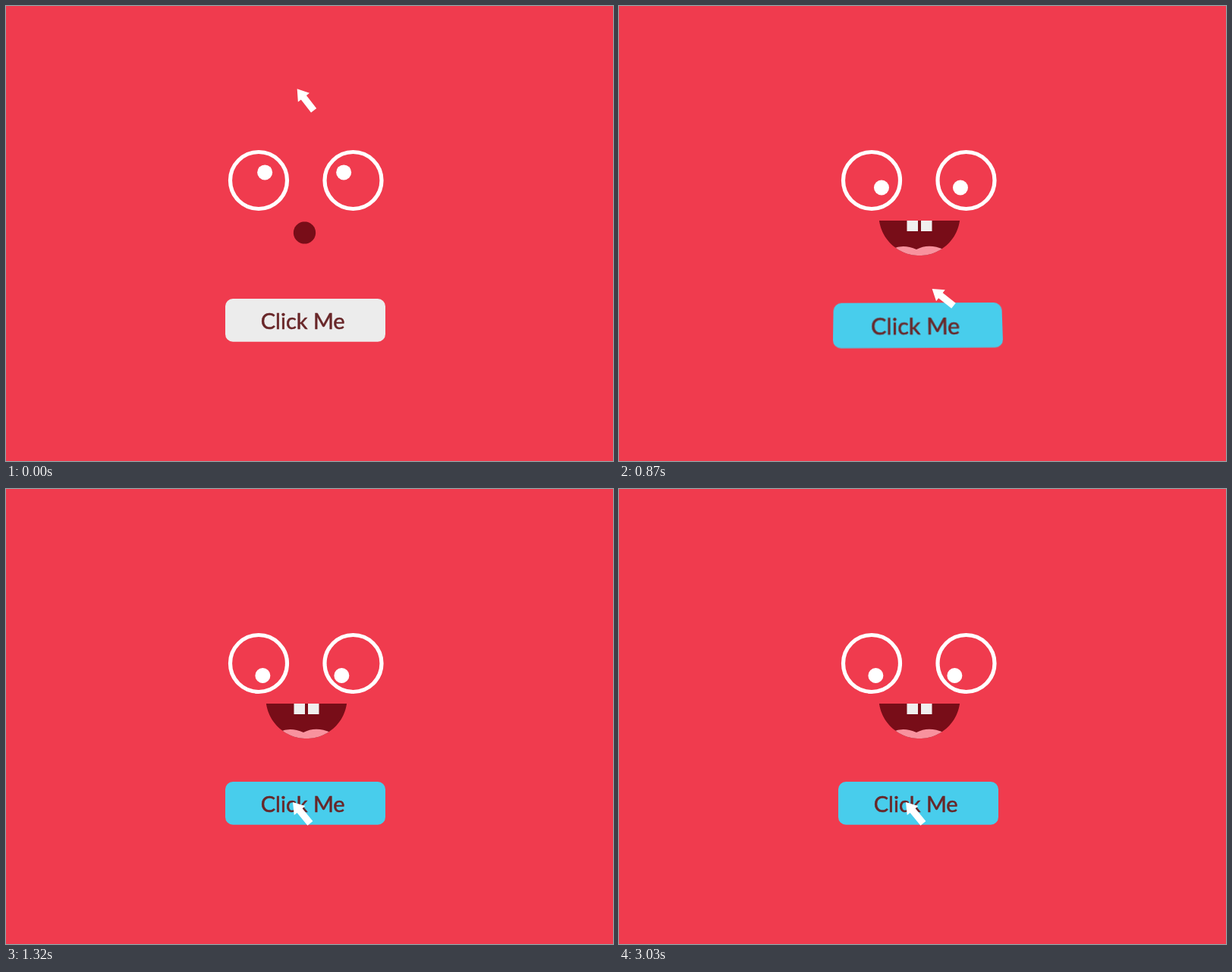
An HTML page that plays this animation: 800x600 px, repeating every 3090 ms.

```html
<!DOCTYPE html>
<html lang="en">
<head>
<meta charset="utf-8">
<title>Click Me</title>
<style>
  html, body { margin: 0; width: 100%; height: 100%; overflow: hidden; background: #f03b4e; }
  body { perspective: 1240px; }
  svg { position: absolute; left: 0; top: 0; overflow: visible; }
  #button { left: 288.5px; top: 386.3px; }
  text { font: 29px Lato, "Open Sans", sans-serif; text-anchor: middle;
    fill: #682628; stroke: #682628; stroke-width: .5; }
</style>
</head>
<body>
<svg width="800" height="600">
  <clipPath id="clip"><path id="mouth"/></clipPath>
  <g fill="none" stroke="#fff" stroke-width="5.2">
    <circle cx="333" cy="230" r="37.5"/>
    <circle cx="457.5" cy="230" r="37.5"/>
  </g>
  <g id="pupils" fill="#fff"><circle r="10"/><circle cx="104" r="10"/></g>
  <g clip-path="url(#clip)">
    <path fill="#780d18" d="M330 270H460V340H330Z"/>
    <path id="teeth" fill="#f0efef" d="M379.5 282H394V297H379.5ZM398 282H412.5V297H398Z"/>
    <path id="tongue" fill="#f8929e" d="M361 320Q375 313.5 392 321Q408 312.5 428 321V335H361Z"/>
  </g>
</svg>
<svg id="button" width="211" height="56.7">
  <rect id="face" width="211" height="56.7" rx="10"/>
  <text x="102.2" y="39.7">Click Me</text>
</svg>
<svg width="800" height="600">
  <path id="cursor" fill="#fff" d="M0 0L14.3 -9.5V-4.5H36V4.5H14.3V9.5Z"/>
</svg>
<script>
const LOOP = 3090, STEP = 30, RAD = Math.PI / 180;
const $ = id => document.getElementById(id);
const mix = (a, b, p) => a + (b - a) * p;
const move = (id, value) => $(id).setAttribute("transform", value);

// time, cursor x, y and tilt, direction of the gaze
const pointer = [
  [0, 383.7, 109.3, 52.5, -57],
  [540, 447, 195.5, 36, -13],
  [690, 482, 313, 26.5, 4],
  [990, 375, 394, 46, 45],
  [1320, 378, 413, 50.5, 69]
];

// time, distance towards the viewer, turns about the x and y axes
const wobble = [
  [840, 0, 0, 0],
  [930, 260, 60, 15],
  [990, 156, 0, 37.5],
  [1080, 95, 0, -27],
  [1110, 10, 0, -18.6],
  [1320, 0, 0, 0]
];

function smooth(from, to, t) {
  const u = Math.min(1, Math.max(0, (t - from) / (to - from)));
  return u * u * (3 - 2 * u);
}

// Smooth interpolation that never overshoots its keys
function sample(keys, t) {
  const last = keys.length - 1;
  if (t <= keys[0][0]) return keys[0].slice(1);
  if (t >= keys[last][0]) return keys[last].slice(1);
  const i = keys.findIndex(k => k[0] > t) - 1;
  const slope = (n, c) => (keys[n + 1][c] - keys[n][c]) / (keys[n + 1][0] - keys[n][0]);
  const tangent = (n, c) => {
    if (n === 0 || n === last) return 0;
    const a = slope(n - 1, c), b = slope(n, c);
    return a * b > 0 ? 2 * a * b / (a + b) : 0;
  };
  const span = keys[i + 1][0] - keys[i][0], u = (t - keys[i][0]) / span;
  return keys[i].slice(1).map((value, n) => {
    const c = n + 1;
    return mix(value, keys[i + 1][c], smooth(0, 1, u))
      + span * u * (1 - u) * ((1 - u) * tangent(i, c) - u * tangent(i + 1, c));
  });
}

function blink(t) {
  for (const start of [1620, 2100, 2880]) {
    const d = t - start;
    if (d > 0 && d < 150) return Math.max(0.04, Math.abs(d - 90) / (d < 90 ? 90 : 60));
  }
  return 1;
}

// Outline between a small circle (p = 0) and a wide grin (p = 1)
function mouth(p) {
  const points = [];
  for (let u = 0; u < 1; u += 1 / 80) {
    const around = 2 * Math.PI * u, along = mix(8, 172, Math.min(1, u / 0.75)) * RAD;
    const grinX = u < 0.75 ? 396 + 53.6 * Math.cos(along) : mix(343, 449, u * 4 - 3);
    const grinY = u < 0.75 ? 275.5 + 53.6 * Math.sin(along) : 283;
    points.push([
      mix(393.5 + 14.6 * Math.sin(around), grinX, p),
      mix(299 - 14.6 * Math.cos(around), grinY, p)
    ]);
  }
  return `M${points.join("L")}Z`;
}

function draw(t) {
  const [x, y, tilt, gaze] = sample(pointer, t);
  move("cursor", `translate(${x} ${y}) rotate(${tilt})`);

  const px = 333 + 15 * Math.cos(gaze * RAD), py = 2 + 15 * Math.sin(gaze * RAD);
  move("pupils", `translate(0 230) scale(1 ${blink(t)}) translate(${px} ${py})`);

  const smile = smooth(570, 780, t);
  $("mouth").setAttribute("d", mouth(smile));
  move("teeth", `translate(0 ${-16 * Math.max(0, 1 - 2 * smile)})`);
  move("tongue", `translate(0 ${12 * (1 - smile)})`);

  const [z, tip, turn] = sample(wobble, t);
  $("button").style.transform = `translateZ(${z}px) rotateY(${turn}deg) rotateX(${tip}deg)`;
  $("face").setAttribute("fill", t < 870 ? "#ececec" : "#48cdec");
}

const begin = performance.now();
function tick() {
  const t = (performance.now() - begin) % LOOP;
  draw(Math.floor(t / STEP) * STEP);
  requestAnimationFrame(tick);
}
tick();
</script>
</body>
</html>
```
